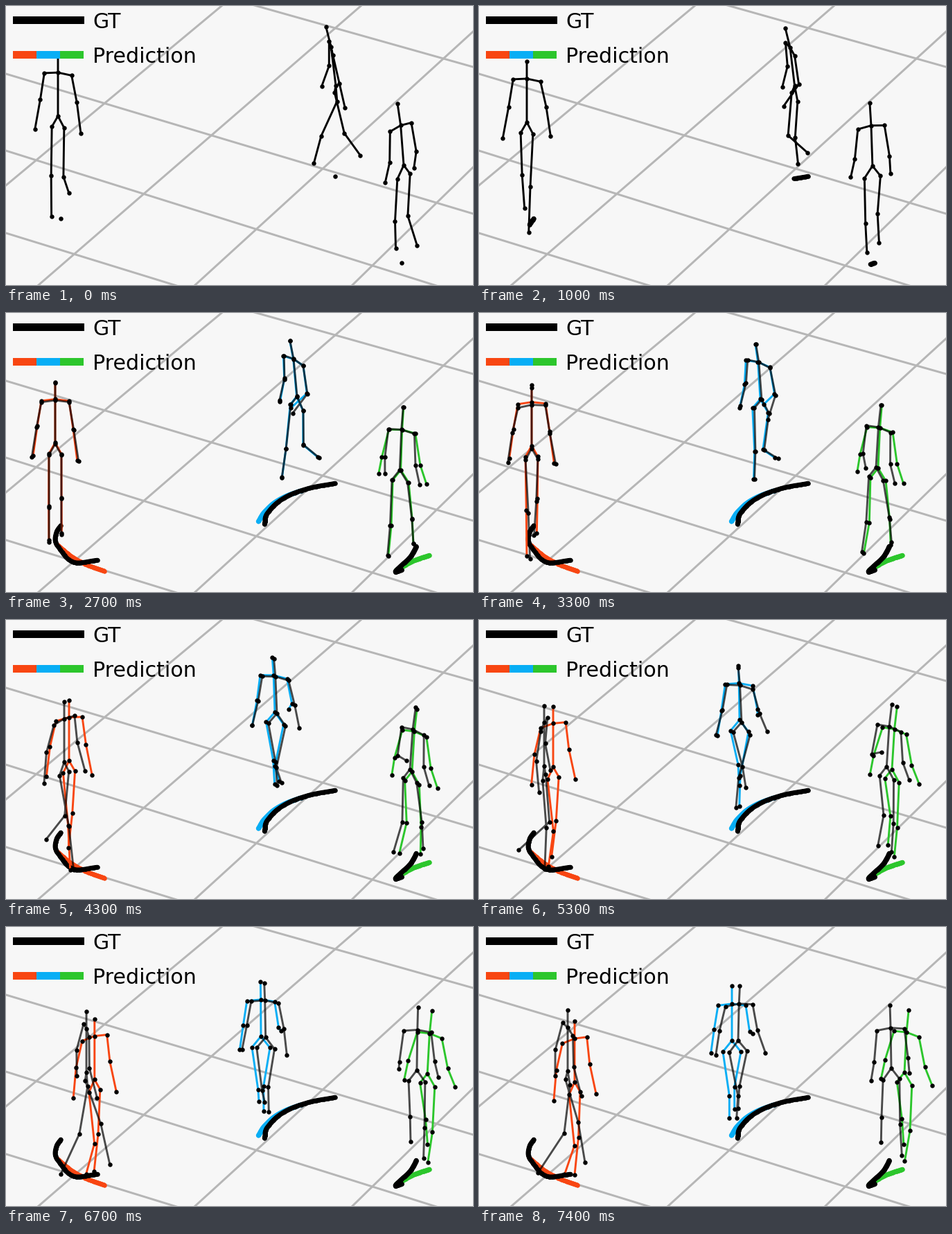
Animation of 674x403 px, one loop 7.5 s. Source, as a matplotlib script:

```python
import numpy as np
import matplotlib.pyplot as plt
from matplotlib.animation import FuncAnimation
from matplotlib.patches import Rectangle

W, H, DPI = 674, 403, 100
FRAMES, STEP = 75, 100
START = 25  # first predicted frame
PX = 72 / DPI
RISE, DEPTH = 0.85, 0.5  # screen share of a vertical and of a floor length
RED, BLUE, GREEN = "#f84612", "#08aef5", "#2cc62c"


def curve(keys, t):
    """Cubic Hermite through {time: value}, clamped at both ends."""
    ts = np.array(sorted(keys), float)
    vs = np.array([keys[k] for k in sorted(keys)], float)
    if len(ts) == 1:
        return vs[0]
    t = np.clip(t, ts[0], ts[-1])
    tan = np.gradient(vs, ts, axis=0)
    i = min(np.searchsorted(ts, t, side="right") - 1, len(ts) - 2)
    h = ts[i + 1] - ts[i]
    u = (t - ts[i]) / h
    return ((2 * u**3 - 3 * u**2 + 1) * vs[i] + (u**3 - 2 * u**2 + u) * h * tan[i]
            + (3 * u**2 - 2 * u**3) * vs[i + 1] + (u**3 - u**2) * h * tan[i + 1])


class Walker:
    """A jointed figure that walks along a floor path.

    turn: heading in degrees, 0 faces the viewer; gait: phase in half turns,
    whole at mid swing; bend_l, bend_r: elbows in degrees.
    """

    def __init__(self, build, path, turn, gait, drop, bend_l, bend_r, splay=6):
        self.build, self.splay = build, splay
        self.curves = dict(path=path, turn=turn, gait=gait, drop=drop,
                           bend_l=bend_l, bend_r=bend_r)

    def at(self, name, t):
        return curve(self.curves[name], t)

    def fork(self, splay, **changes):
        """A copy that leaves this walker's motion when the prediction starts."""
        t = START - 1
        curves = {k: {t: self.at(k, t), **changes[k]} if k in changes else v
                  for k, v in self.curves.items()}
        return Walker(self.build, splay=splay, **curves)

    def trail(self, first, last):
        return np.array([self.at("path", t) for t in range(first, last + 1)])

    def joints(self, t):
        b = self.build
        turn, gait = np.radians(self.at("turn", t)), np.pi * self.at("gait", t)
        side = np.array([np.cos(turn), DEPTH * np.sin(turn)])
        ahead = np.array([-np.sin(turn), DEPTH * np.cos(turn)])
        up = np.array([0, -RISE])

        def bone(length, swing, out=0):
            s, o = np.radians(swing), np.radians(out)
            return length * (np.sin(o) * side
                             + np.cos(o) * (np.sin(s) * ahead - np.cos(s) * up))

        pelvis = self.at("path", t) + [b["shift"], -self.at("drop", t)]
        neck = pelvis - bone(b["spine"], -b["lean"])
        head = neck - bone(b["head"], -2 * b["lean"])
        arms, legs = [], []
        for s, bend in [(-1, "bend_l"), (1, "bend_r")]:
            shoulder = neck + s * 20 * side - 3 * up
            swing = -6 - 5 * s * np.sin(gait)
            elbow = shoulder + bone(b["upper"], swing, s * self.splay)
            hand = elbow + bone(b["fore"], swing + self.at(bend, t), s * self.splay)
            arms.append([shoulder, elbow, hand])

            hip = pelvis + s * b["hip"] * side - 19 * up
            swing = 4 + s * b["stride"] * np.sin(gait)
            flex = 6 + b["knee"] * max(0, s * np.cos(gait))
            knee = hip + bone(b["thigh"], swing, -s * b["cross"])
            ankle = knee + bone(b["shank"], swing - flex)
            legs.append([hip, knee, ankle])
        return np.array([head, neck, pelvis]), np.array(arms), np.array(legs)


left = Walker(
    dict(spine=74, head=29, upper=49, fore=49, thigh=80, shank=71, hip=9, lean=0,
         shift=-4, stride=13, knee=38, cross=0),
    path={0: (79, 307), 10: (73, 316), 20: (71, 329), 33: (80, 344), 43: (88, 354),
          53: (98, 360), 74: (132, 357)},
    turn={0: 10, 20: 6, 33: -10, 53: -76, 74: -112},
    gait={0: 0, 20: 1, 33: 1.5, 43: 1.7, 53: 2, 61: 2.4, 74: 2.7},
    drop={0: 148, 74: 149}, bend_l={0: 13}, bend_r={0: 13}, splay=8)
left_guess = left.fork(
    7, path={33: (80, 340), 43: (95, 352), 53: (111, 361), 74: (142, 373)},
    turn={33: -3, 43: -18, 74: -28}, gait={33: 1.5, 53: 1.3, 74: 1.2})

middle = Walker(
    dict(spine=67, head=35, upper=46, fore=39, thigh=67, shank=46, hip=13, lean=6,
         shift=1, stride=16, knee=43, cross=8),
    path={0: (475, 246), 20: (434, 254), 33: (407, 264), 43: (390, 275),
          53: (378, 288), 74: (373, 305)},
    turn={0: 82, 20: 58, 33: 36, 43: 18, 61: 20, 74: -10},
    gait={0: 0.6, 20: 1.5, 33: 1.9, 53: 2.5, 61: 2.9, 74: 3.3},
    drop={0: 131, 20: 137, 74: 141}, bend_l={0: 16},
    bend_r={0: 0, 20: 75, 33: 50, 43: 5, 61: 0, 74: 60}, splay=9)
middle_guess = middle.fork(
    7, path={33: (405, 264), 43: (387, 274), 53: (375, 285), 74: (364, 301)},
    turn={33: 30, 43: 15, 74: 0}, drop={43: 141, 74: 137}, bend_r={33: 100, 74: 118})

right = Walker(
    dict(spine=65, head=35, upper=49, fore=36, thigh=74, shank=46, hip=12, lean=6,
         shift=3, stride=10, knee=25, cross=0),
    path={0: (571, 371), 20: (562, 373), 33: (570, 365), 43: (580, 356),
          61: (588, 345), 74: (592, 337)},
    turn={0: 140, 20: 186, 33: 210, 53: 212, 74: 172},
    gait={0: 1, 20: 1.5, 33: 1.55, 43: 1.8, 53: 2.15, 74: 2.7},
    drop={0: 141, 20: 143, 74: 133}, bend_l={0: 22},
    bend_r={0: 15, 33: 25, 53: 75, 61: 75, 74: 20})
right_guess = right.fork(
    12, path={33: (573, 366), 43: (583, 360), 53: (593, 356), 74: (611, 350)},
    turn={43: 210, 74: 206}, gait={43: 2, 61: 2.5, 74: 2.65},
    drop={43: 141, 74: 140}, bend_l={43: 16}, bend_r={43: 14})

fig = plt.figure(figsize=(W / DPI, H / DPI), dpi=DPI, facecolor="#f7f7f7")
ax = fig.add_axes([0, 0, 1, 1])
ax.set_xlim(0, W)
ax.set_ylim(H, 0)
ax.axis("off")

# floor grid
for x0, y0, x1, y1 in [(362, 0, 674, 88), (0, 98, 674, 300), (0, 209, 618, 403), (0, 328, 243, 403),
                       (311, 0, 0, 259), (512, 0, 47, 403), (674, 37, 273, 403), (674, 233, 500, 403)]:
    dx, dy = (x1 - x0) * 0.05, (y1 - y0) * 0.05
    ax.plot([x0 - dx, x1 + dx], [y0 - dy, y1 + dy], color="#b6b6b6", lw=3 * PX, zorder=1)

# legend
ax.add_patch(Rectangle((9.5, 14.5), 103, 11, fc="black", lw=0, zorder=10))
for i, col in enumerate([RED, BLUE, GREEN]):
    ax.add_patch(Rectangle((9.5 + 34.3 * i, 64.5), 34.3, 11, fc=col, lw=0, zorder=10))
for y, label in [(31.5, "GT"), (81.5, "Prediction")]:
    ax.text(125, y, label, family="DejaVu Sans", size=30 * PX, color="black", va="baseline", zorder=10)


def stroke(col, width, z, dot=0):
    return ax.plot([], [], color=col, lw=width * PX, marker="o" if dot else "", ms=dot * PX, mew=0,
                   solid_capstyle="round", solid_joinstyle="round", zorder=z)[0]


class Actor:
    def __init__(self, walker, col, z, first=0):
        self.walker, self.first = walker, first
        self.trail = stroke(col, 6.5, 2 + z, 6.5)
        self.lines = stroke(col, 2.9, 4 + z)
        self.dots = stroke("black", 0, 7, 6.4)

    def draw(self, k):
        shown = k >= self.first
        for art in (self.trail, self.lines, self.dots):
            art.set_visible(shown)
        if not shown:
            return
        trunk, arms, legs = self.walker.joints(k)
        gap = np.full((1, 2), np.nan)
        bones = [trunk]
        for root, limbs in [(trunk[1:2], arms), (trunk[2:], legs)]:
            for limb in limbs:
                bones += [gap, root, limb]
        self.lines.set_data(*np.concatenate(bones).T)
        self.dots.set_data(*np.concatenate([trunk, *arms, *legs]).T)
        last = FRAMES - 1 if k >= START else k
        self.trail.set_data(*self.walker.trail(max(self.first - 1, 0), last).T)
        if not self.first:
            self.lines.set_alpha(0.7 if k >= START else 1)


guesses = [(left_guess, RED), (middle_guess, BLUE), (right_guess, GREEN)]
actors = [Actor(w, col, 0, START) for w, col in guesses]
actors += [Actor(w, "black", 1) for w in (left, middle, right)]


def update(k):
    for actor in actors:
        actor.draw(k)
    return []


anim = FuncAnimation(fig, update, frames=FRAMES, interval=STEP, repeat=True, repeat_delay=0, blit=False)
plt.show()
```
